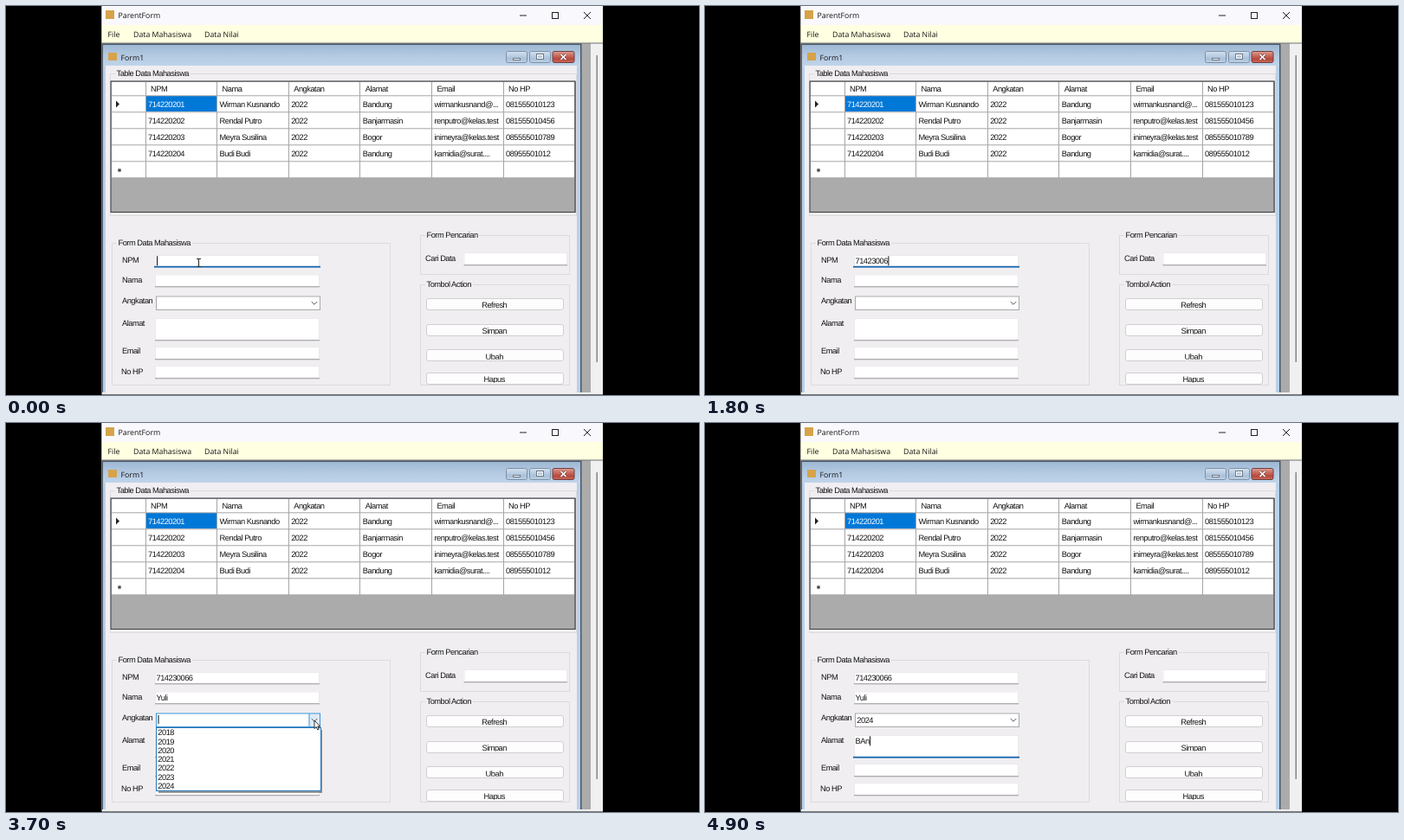
An HTML page with a canvas for the animation above (5000 ms loop, 800 px wide and 450 px high).

```html
<!DOCTYPE html>
<html lang="id">
<head>
<meta charset="utf-8">
<title>ParentForm</title>
<style>
  html, body { margin: 0; width: 100%; height: 100%; overflow: hidden; background: #000; }
  canvas { display: block; width: 800px; height: 450px; }
</style>
</head>
<body>
<canvas id="stage" width="800" height="450"></canvas>
<script>
const ctx = document.getElementById('stage').getContext('2d');
const LOOP = 5000, STEP = 100;
const FORM_FONT = '9.3px "Liberation Sans", Arial, sans-serif';
const UI_FONT = '8.8px "Open Sans", "Noto Sans", sans-serif';
const FACE = '#f0eef1', BLUE = '#0078d7', ACCENT = '#1765ad', INK = '#141414';

const headers = ['NPM', 'Nama', 'Angkatan', 'Alamat', 'Email', 'No HP'];
const rows = [
  ['714220201', 'Wirman Kusnando', '2022', 'Bandung', 'wirmankusnand@...', '081555010123'],
  ['714220202', 'Rendal Putro', '2022', 'Banjarmasin', 'renputro@kelas.test', '081555010456'],
  ['714220203', 'Meyra Susilina', '2022', 'Bogor', 'inimeyra@kelas.test', '085555010789'],
  ['714220204', 'Budi Budi', '2022', 'Bandung', 'kamidia@surat....', '08955501012']
];
const fields = {
  npm: { label: 'NPM', ly: 294, y: 288, h: 14 },
  nama: { label: 'Nama', ly: 317, y: 310.5, h: 14.5 },
  alamat: { label: 'Alamat', ly: 367, y: 361, h: 26 },
  email: { label: 'Email', ly: 399, y: 394, h: 15 },
  hp: { label: 'No HP', ly: 423, y: 416, h: 15 }
};

// Each key press: time and the text shown from then on.
const typing = {
  npm: [[500, '7'], [600, '71'], [800, '714'], [900, '7142'], [1000, '71423'],
        [1200, '714230'], [1400, '7142300'], [1700, '71423006'], [1900, '714230066']],
  nama: [[2500, 'Y'], [2600, 'Yu'], [2650, 'Yul'], [2700, 'Yuli']],
  alamat: [[4800, 'B'], [4900, 'BAn']]
};
const focusPlan = [[0, 'npm'], [2200, 'nama'], [3700, 'combo'], [4500, 'alamat']];
const OPEN = 3700, PICK = 4200;
const pointer = [[3100, 220, 314], [3200, 219, 324], [3500, 356, 344], [3800, 356, 344],
                 [4100, 260, 418], [4300, 260, 416], [4700, 260, 416]];

function box(x, y, w, h, fill) {
  ctx.fillStyle = fill;
  ctx.fillRect(x, y, w, h);
}

function frame(x, y, w, h, color) {
  ctx.strokeStyle = color;
  ctx.lineWidth = 1;
  ctx.strokeRect(x + .5, y + .5, w - 1, h - 1);
}

function path(points, color, width = 1) {
  ctx.strokeStyle = color;
  ctx.lineWidth = width;
  ctx.beginPath();
  points.forEach(([x, y]) => ctx.lineTo(x, y));
  ctx.stroke();
}

function rounded(x, y, w, h, r, fill, line) {
  ctx.beginPath();
  ctx.roundRect(x + .5, y + .5, w - 1, h - 1, r);
  ctx.fillStyle = fill;
  ctx.fill();
  ctx.strokeStyle = line;
  ctx.lineWidth = 1;
  ctx.stroke();
}

function shade(y0, y1, ...colors) {
  const g = ctx.createLinearGradient(0, y0, 0, y1);
  colors.forEach((c, i) => g.addColorStop(i / (colors.length - 1), c));
  return g;
}

function setFont(ui) {
  ctx.font = ui ? UI_FONT : FORM_FONT;
  ctx.letterSpacing = ui ? '0px' : '-0.5px';
  ctx.textRendering = 'geometricPrecision';
}

// y is the vertical middle of the capitals
function text(str, x, y, color = INK, ui = false) {
  setFont(ui);
  ctx.fillStyle = color;
  ctx.fillText(str, x, y + 3.3);
}

function group(title, x, y, w, bottom) {
  frame(x, y, w, bottom - y, '#dcdadd');
  setFont();
  box(x + 6, y - 1, ctx.measureText(title).width + 3, 3, FACE);
  text(title, x + 7.5, y);
}

function drawWindow() {
  box(0, 0, 800, 450, '#000');
  box(110.5, 0, 578.5, 449.5, '#f0f0f0');
  box(110.5, 0, 578.5, 22, '#f9f9fd');
  box(115, 5, 10, 10, '#d6a34a');
  text('ParentForm', 129.5, 10.8, INK, true);
  path([[593, 11], [601, 11]], '#222');
  frame(630, 7, 8, 8, '#222');
  path([[667, 7], [675, 15]], '#222');
  path([[675, 7], [667, 15]], '#222');

  box(110.5, 22, 578.5, 20.5, '#ffffe1');
  text('File', 117.5, 32.3, INK, true);
  text('Data Mahasiswa', 147, 32.3, INK, true);
  text('Data Nilai', 229, 32.3, INK, true);

  box(111, 43, 564, 404, '#ababab');
  box(111, 42.5, 578, 1, '#747474');
  box(681.5, 57, 1.5, 355, '#858585');
}

function drawChild() {
  box(111, 43.5, 553.5, 403.5, '#4b5866');
  box(112, 45, 551, 402, '#b9d1ea');
  box(112, 45, 551, 25, shade(45, 70, '#9db7d3', '#b4cae2', '#c0d5eb'));
  box(115, 69, 544, 378, FACE);
  box(118, 54, 10, 9, '#d6a34a');
  text('Form1', 132.5, 59.2, INK, true);

  const glass = shade(52, 66, '#d4e2f0', '#c0d2e5', '#a9c0d8', '#c0d5e9');
  rounded(577, 52, 25, 14, 2, glass, '#7e90a4');
  rounded(604, 52, 25, 14, 2, glass, '#7e90a4');
  rounded(630.5, 52, 26, 14, 2, shade(52, 66, '#e0a59a', '#cb7265', '#b8483b', '#cb6f60'), '#70403f');
  box(585, 60, 9, 3, '#6d7782');
  box(586, 61, 7, 1, '#fff');
  frame(612, 55, 9, 7, '#6d7782');
  frame(613, 56, 7, 5, '#fff');
  for (const [c, w] of [['#7b4a46', 3], ['#fff', 1.6]]) {
    path([[640.5, 56], [646.5, 62]], c, w);
    path([[646.5, 56], [640.5, 62]], c, w);
  }
}

function drawTable() {
  const colX = i => Math.floor(161 + i * 82.6);
  group('Table Data Mahasiswa', 120, 78, 539, 243);
  box(121, 87, 537, 152, '#ababab');
  box(122, 88, 535, 111, '#fff');
  box(162, 104, 81, 18, BLUE);
  for (let i = 0; i < 6; i++) {
    box(122, 103.3 + i * 19, 535, 1, '#a5a5a8');
  }
  for (let i = 0; i < 7; i++) box(colX(i), 88, 1, 111, '#a5a5a8');
  headers.forEach((h, i) => text(h, 167 + i * 82.6, 96));
  rows.forEach((row, r) => row.forEach((cell, c) =>
    text(cell, 164 + c * 82.6, 113.2 + r * 19, r || c ? INK : '#fff')));
  frame(120.5, 86.5, 537, 152.5, '#39393c');

  ctx.fillStyle = '#222';
  ctx.beginPath();
  ctx.moveTo(127, 109.5);
  ctx.lineTo(131, 113.5);
  ctx.lineTo(127, 117.5);
  ctx.fill();
  for (let i = 0; i < 3; i++) {
    const a = i * Math.PI / 3, dx = 2.3 * Math.sin(a), dy = 2.3 * Math.cos(a);
    path([[131 - dx, 190 - dy], [131 + dx, 190 + dy]], '#333');
  }
}

function input(x, y, w, h, focused) {
  box(x, y, w, h, '#fff');
  frame(x, y, w, h, '#ebe9ec');
  if (focused) box(x - 1, y + h - 1.2, w + 2, 1.8, ACCENT);
  else box(x, y + h - .7, w, 1, '#98979a');
}

function button(label, y, h, textY) {
  rounded(485, y, 159, h, 2.5, '#fdfdfd', '#d0ced1');
  ctx.save();
  ctx.beginPath();
  ctx.rect(486, y, 157, h - 2.2);
  ctx.clip();
  ctx.textAlign = 'center';
  text(label, 563.7, textY);
  ctx.restore();
}

function drawPanels() {
  group('Form Data Mahasiswa', 122, 274, 322, 439);
  group('Form Pencarian', 478, 265, 173, 311);
  text('Cari Data', 484, 292);
  input(528.5, 285, 119.5, 15, false);
  group('Tombol Action', 478, 322, 173, 439);
  button('Refresh', 338, 14, 345.4);
  button('Simpan', 368, 14, 376);
  button('Ubah', 397, 14, 405.2);
  button('Hapus', 424, 14, 432);
}

function latest(list, t) {
  return list.filter(k => k[0] <= t).pop();
}

function caret(x, y, h) {
  box(x, y, 1, h, '#111');
}

function drawFields(t, focus, blink) {
  for (const [name, f] of Object.entries(fields)) {
    const active = focus === name;
    const key = latest(typing[name] || [], t);
    const value = key ? key[1] : '';
    text(f.label, name === 'hp' ? 133 : 134, f.ly);
    input(172, f.y, 190, f.h, active);
    const textY = f.y + 6.8;
    text(value, 173.5, textY);
    if (active && blink) {
      caret(174 + ctx.measureText(value).width, textY - 5.5, 11);
    }
  }
}

function drawCombo(t, focus, blink, at) {
  const active = focus === 'combo', open = t >= OPEN && t < PICK;
  const edge = '#3c93d6';
  text('Angkatan', 134, 341);
  box(173, 335.5, 190, 16, '#fff');
  if (active) {
    box(350, 336, 12, 15, '#dcecf9');
    box(349.5, 336, 1, 15, edge);
  }
  frame(173, 335.5, 190, 16.5, active ? edge : '#aaa8ab');
  path([[352.7, 342], [356, 345.3], [359.3, 342]], '#555');
  if (t >= PICK) {
    if (active) box(175, 338, 20.5, 10.5, '#1c78c8');
    text('2024', 175.3, 343.3, active ? '#fff' : INK);
  } else if (active && blink) {
    caret(175.5, 338, 10);
  }
  if (!open) return;
  box(176, 355, 189, 73, 'rgba(0,0,0,.4)');
  box(173, 352, 191, 74, '#fff');
  frame(173, 352, 191, 74, '#2b77b5');
  const over = at && at[1] > 353 ? Math.min(6, Math.floor((at[1] - 353) / 10.3)) : -1;
  for (let i = 0; i < 7; i++) {
    const y = 358 + i * 10.27;
    if (i === over) box(174, y - 5, 189, 10.2, BLUE);
    text(String(2018 + i), 175.3, y, i === over ? '#fff' : INK);
  }
}

function pointerAt(t) {
  const i = pointer.findIndex(p => p[0] > t);
  if (i < 1) return null;
  const [t0, x0, y0] = pointer[i - 1], [t1, x1, y1] = pointer[i];
  const u = (t - t0) / (t1 - t0);
  return [x0 + (x1 - x0) * u, y0 + (y1 - y0) * u];
}

function drawArrow([x, y]) {
  ctx.beginPath();
  for (const [dx, dy] of [[0, 0], [0, 9.5], [2.2, 7.5], [3.8, 11], [5.3, 10.3], [3.8, 7], [6.6, 7]]) {
    ctx.lineTo(x + dx, y + dy);
  }
  ctx.closePath();
  ctx.fillStyle = '#fff';
  ctx.fill();
  ctx.strokeStyle = '#222';
  ctx.lineWidth = .9;
  ctx.stroke();
}

function drawBeam(x, y) {
  box(x, y - 4, 1, 8, '#222');
  box(x - 2, y - 5, 5, 1, '#333');
  box(x - 2, y + 4, 5, 1, '#333');
}

function draw(t) {
  const [since, focus] = latest(focusPlan, t);
  const key = latest(typing[focus] || [], t);
  const blink = (t - Math.max(since, key ? key[0] : 0)) % 1000 < 500;
  const at = pointerAt(t);
  drawWindow();
  drawChild();
  drawTable();
  drawPanels();
  drawFields(t, focus, blink);
  drawCombo(t, focus, blink, at);
  if (t < 500) drawBeam(222, 297);
  if (at) drawArrow(at);
}

const start = performance.now();
function tick() {
  const t = (performance.now() - start) % LOOP;
  draw(Math.floor(t / STEP) * STEP);
  requestAnimationFrame(tick);
}
tick();
</script>
</body>
</html>
```
